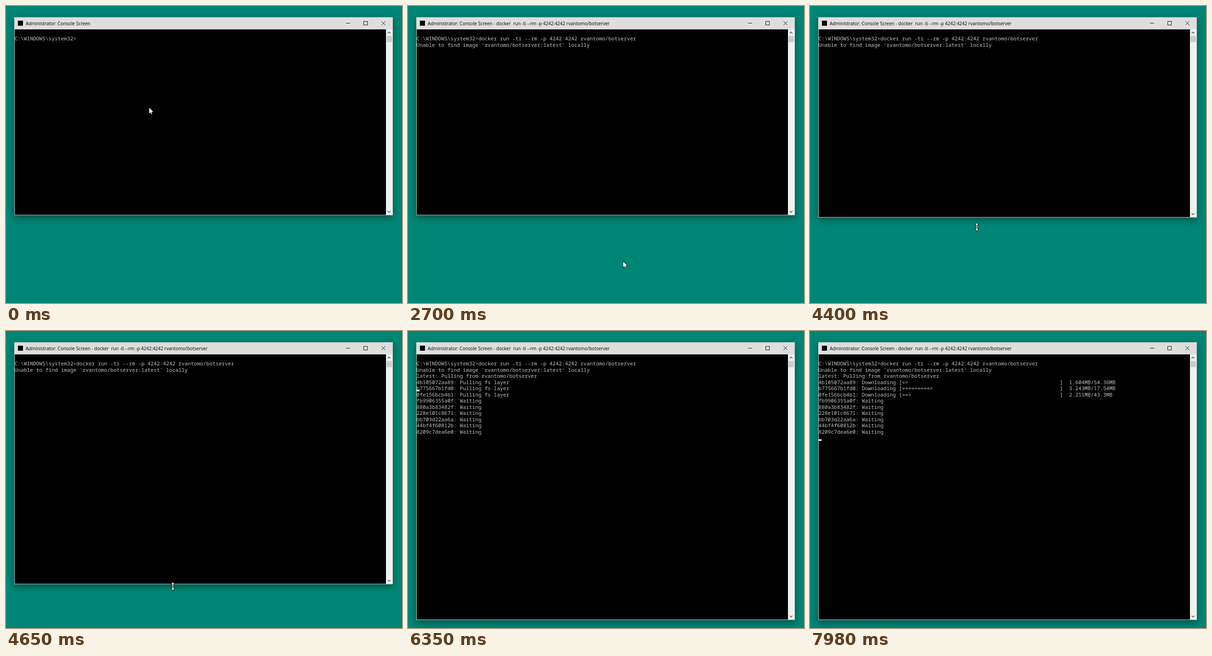
An HTML page with a canvas for the animation above (8 s loop, 864 px wide and 648 px high).

```html
<!DOCTYPE html>
<html lang="en">
<head>
<meta charset="utf-8">
<title>Console</title>
<style>
html, body { margin: 0; width: 100%; height: 100%; overflow: hidden; background: #018574; }
canvas { display: block; }
</style>
</head>
<body>
<canvas id="stage" width="864" height="648"></canvas>
<script>
const ctx = document.getElementById('stage').getContext('2d');
const LOOP = 8000, END = 7980;
const CELL = 6.75, ROW = 13.5, LEFT = 18.5, TOP = 51;
const PROMPT = 'C:\\WINDOWS\\system32>';
const IMAGE = 'rvantomo/botserver';
const COMMAND = 'docker run -ti --rm -p 4242:4242 ' + IMAGE;
const TITLE = 'Administrator: Console Screen';

const TYPE = 90, ENTER = 690, MISSING = 1080, PULL = 4880, FETCH = 6440;

// Downloads: id, total size, chunk size in MB, chunks at the end, start time
const layers = [
  { id: '4b105072aa89', total: 54.36, chunk: 1.604 / 3, count: 3, start: 6700 },
  { id: 'b775667b1fd0', total: 17.54, chunk: 3.243 / 18, count: 18, start: FETCH },
  { id: '0fe156bcb4b1', total: 43.3, chunk: 2.211 / 5, count: 5, start: 6620 }
];
const waiting = ['fb9906355a0f', '880a3b83482f', '228e101c8671',
  'bb703d22aa6a', '44bf4f60812b', '8209c7dea6e0'];

// Pointer keys: time, x, y
const pointerPath = [
  [1150, 312, 222], [2000, 434, 452], [2230, 434, 452], [2600, 469, 557],
  [2900, 469, 557], [3270, 401, 473], [3900, 364, 461], [4250, 364, 461]
];
const leavePath = [[5250, 363, 626], [6200, 300, 480]];

// Resize steps: time, window bottom, pointer x, pointer y
const resize = [
  [4400, 461, 364, 482], [4490, 490, 364, 506], [4570, 521, 364, 531],
  [4650, 552, 364, 557], [4720, 588, 363, 596], [4800, 620, 362.5, 630.5],
  [4880, 630, 363, 632]
];

function box(x, y, w, h, color) {
  ctx.fillStyle = color;
  ctx.fillRect(x, y, w, h);
}

function line(points, color, width) {
  ctx.beginPath();
  points.forEach(([x, y]) => ctx.lineTo(x, y));
  ctx.strokeStyle = color;
  ctx.lineWidth = width;
  ctx.stroke();
}

function shape(points, x, y) {
  ctx.beginPath();
  points.forEach(([dx, dy]) => ctx.lineTo(x + dx, y + dy));
  ctx.closePath();
  ctx.lineWidth = 1.5;
  ctx.strokeStyle = '#000';
  ctx.stroke();
  ctx.fillStyle = '#fff';
  ctx.fill();
}

function along(path, t) {
  const q = Math.floor(t / 85) * 85;
  let i = 0;
  while (i < path.length - 2 && q >= path[i + 1][0]) i++;
  const [a, b] = [path[i], path[i + 1]];
  const p = Math.min(1, Math.max(0, (q - a[0]) / (b[0] - a[0])));
  const e = p * p * (3 - 2 * p);
  return [a[1] + (b[1] - a[1]) * e, a[2] + (b[2] - a[2]) * e];
}

function resizeStep(t) {
  return resize.filter(step => t >= step[0]).pop();
}

function drawArrow(x, y) {
  shape([[0.5, 0.5], [0.5, 13], [3.4, 10.4], [5.3, 14.8], [7, 14], [5.1, 9.8], [9, 9.6]], x, y);
}

function drawSizer(x, y) {
  const half = [[0, -8.5], [3.4, -4.6], [0.8, -4.6]];
  const right = half.concat(half.slice().reverse().map(([dx, dy]) => [dx, -dy]));
  const left = right.slice().reverse().map(([dx, dy]) => [-dx, dy]);
  shape(right.concat(left), x, y);
}

function drawWindow(bottom, running) {
  box(0, 0, 864, 648, '#018574');
  ctx.save();
  ctx.shadowColor = 'rgba(0,0,0,0.42)';
  ctx.shadowBlur = 14;
  ctx.shadowOffsetY = 4;
  box(18, 24.5, 826, bottom - 24, '#c9d3d1');
  ctx.restore();

  box(18, 25, 825.5, 26, '#dedede');
  box(19, 51, 810, bottom - 51.5, '#000');
  box(829, 51, 14.5, bottom - 51.5, '#f0f0f0');
  box(830, 65.5, 12, 13.5, '#cdcdcd');
  box(26, 32, 11, 11, '#000');

  const chevron = (y, d) => line([[832.8, y + d], [835.8, y - d], [838.8, y + d]], '#505050', 1.5);
  chevron(58.2, 1.5);
  chevron(bottom - 7.3, -1.5);

  line([[742, 37.5], [751, 37.5]], '#111', 1);
  ctx.strokeRect(780.5, 33.5, 8, 8);
  line([[819.3, 33.3], [827.7, 41.7]], '#111', 1);
  line([[827.7, 33.3], [819.3, 41.7]], '#111', 1);

  ctx.font = '10px "Open Sans", "Noto Sans", sans-serif';
  ctx.fillStyle = '#000';
  ctx.fillText(running ? TITLE + ' - ' + COMMAND.replace(' ', '  ') : TITLE, 43, 41.5);
}

function layerText(layer, t) {
  if (t < layer.start) return layer.id + ': Pulling fs layer';
  const p = Math.min(1, (t - layer.start) / (END - layer.start));
  const mb = layer.chunk * (1 + Math.floor((layer.count - 1) * p));
  const done = Math.floor(mb / layer.total * 50);
  const bar = ('='.repeat(done) + '>').padEnd(51);
  const size = mb < 1 ? Number((mb * 1000).toPrecision(4)) + 'kB'
                      : Number(mb.toPrecision(4)) + 'MB';
  return `${layer.id}: Downloading [${bar}]  ${size}/${layer.total}MB`;
}

function typed(t) {
  if (t < TYPE) return 0;
  const step = Math.floor((t - TYPE) / 90) + 1;
  return Math.min(COMMAND.length, step * 11);
}

function consoleLines(t) {
  const rows = ['', PROMPT + COMMAND.slice(0, typed(t))];
  if (t >= MISSING) rows.push(`Unable to find image '${IMAGE}:latest' locally`);
  if (t >= PULL) {
    rows.push('latest: Pulling from ' + IMAGE);
    layers.forEach(layer => rows.push(layerText(layer, t)));
    waiting.forEach(id => rows.push(id + ': Waiting'));
  }
  return rows;
}

function caret(t) {
  if (t < TYPE) return null;
  if (t < ENTER) return [PROMPT.length + typed(t), 1];
  if (t < MISSING) return [0, 2];
  if (t < PULL) {
    const on = t < 4400 && Math.floor((t - ENTER) / 530) % 2 === 0;
    return on ? [0, 3] : null;
  }
  if (t < 6350) return t >= 5250 && t < 5780 ? [0, 13] : null;
  return [0, t < FETCH ? 5 : 13];
}

function drawConsole(t) {
  ctx.font = '11.25px "Noto Sans Mono", "DejaVu Sans Mono", monospace';
  ctx.fillStyle = '#c4c4c4';
  consoleLines(t).forEach((text, row) => ctx.fillText(text, LEFT, TOP + row * ROW + 10.7));
  const at = caret(t);
  if (at) box(LEFT + at[0] * CELL, TOP + (at[1] + 1) * ROW - 3.7, CELL, 3.4, '#fff');
}

function drawPointer(t, step) {
  if (t < TYPE) return drawArrow(312, 221.5);
  if (t < 1150 || t >= 6200) return;
  if (t >= 5250) return drawArrow(...along(leavePath, t));
  if (step) return drawSizer(step[2], step[3]);
  const [x, y] = along(pointerPath, t);
  (t < 3800 ? drawArrow : drawSizer)(x, y);
}

function draw(t) {
  const step = resizeStep(t);
  drawWindow(step ? step[1] : 456, t >= ENTER);
  drawConsole(t);
  drawPointer(t, step);
}

function tick() {
  draw(performance.now() % LOOP);
  requestAnimationFrame(tick);
}
tick();
</script>
</body>
</html>
```
